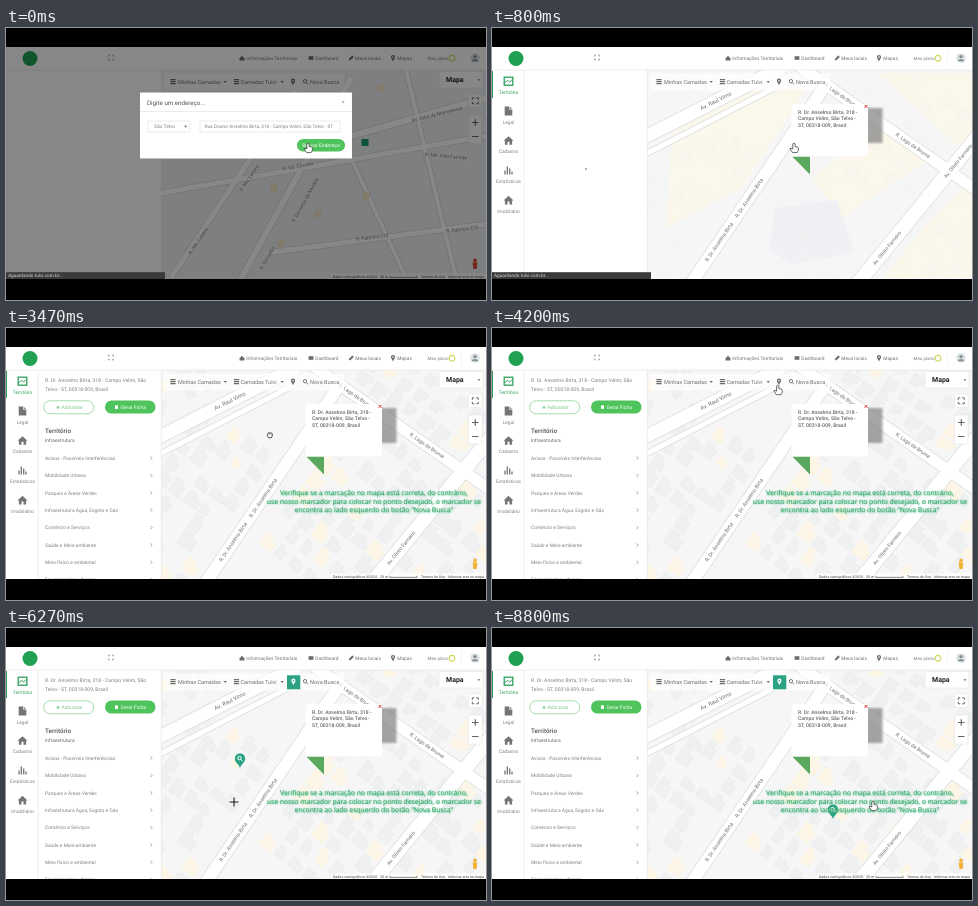
These frames come from a looping animation (480x272 px, 8870 ms). An HTML page:

```html
<!DOCTYPE html>
<html lang="pt-BR">
<head>
<meta charset="utf-8">
<title>Busca no mapa</title>
<style>
html, body { margin: 0; width: 100%; height: 100%; overflow: hidden; background: #000; }
svg { display: block; width: 100vw; height: 100vh; }
text { font-family: Roboto, Arial, sans-serif; text-rendering: geometricPrecision; }
.caption text { font-family: "Open Sans", "Noto Sans", sans-serif; text-shadow: .7px .9px 1.5px #4fc487, 0 0 2px #a5e2c0; }
</style>
</head>
<body>
<svg id="stage" viewBox="0 0 480 272"></svg>
<script>
const LOOP = 8870, GREEN = '#4fc45c', TEAL = '#2ba283', GREY = '#828282', INK = '#6c6c6c';
const CITY = 'São Telvo', STREET = 'R. Dr. Anselmo Birta', AVENUE = 'Av. Olinto Farneiro';

// Drawing helpers
const text = (x, y, s, size = 4.9, fill = GREY, more = '') =>
  `<text x="${x}" y="${y}" font-size="${size}" fill="${fill}" ${more}>${s}</text>`;
const mid = 'text-anchor="middle"', bold = 'font-weight="500"';
const rect = (x, y, w, h, fill, more = '') =>
  `<rect x="${x}" y="${y}" width="${w}" height="${h}" fill="${fill}" ${more}/>`;
const dot = (x, y, r, fill, more = '') => `<circle cx="${x}" cy="${y}" r="${r}" fill="${fill}" ${more}/>`;
const fillPath = (d, fill, more = '') => `<path d="${d}" fill="${fill}" ${more}/>`;
const line = (d, color, width = 1, more = '') =>
  `<path d="${d}" fill="none" stroke="${color}" stroke-width="${width}" ${more}/>`;
const group = (id, body, more = '') => `<g id="${id}" ${more}>${body}</g>`;
const at = (x, y, body, scale = 1) => `<g transform="translate(${x} ${y}) scale(${scale})">${body}</g>`;
const label = (x, y, angle, s, size = 5.2, fill = '#6b6e72') =>
  `<g transform="translate(${x} ${y}) rotate(${angle})">${text(0, 1.8, s, size, fill, mid + ' stroke="#fff" stroke-width=".9" paint-order="stroke"')}</g>`;
const roads = (list, edge, fill) =>
  list.map(([d, w]) => line(d, edge, w + 1.6)).join('') + list.map(([d, w]) => line(d, fill, w)).join('');

// Icons, centred on 0,0
const pin = (color, hole = '#fff') =>
  fillPath('M0 3.4C-.9 .9-2.1 .2-2.1-1.1a2.1 2.1 0 1 1 4.2 0C2.1 .2 .9 .9 0 3.4Z', color) + dot(0, -1.1, .8, hole);
const lens = (color, w = .9) => dot(-.5, -.5, 1.7, 'none', `stroke="${color}" stroke-width="${w}"`) + line('M.8 .8L2.6 2.6', color, w);
const layers = color => line('M-2.6-2h5.2M-2.6 0h5.2M-2.6 2h5.2', color, 1.2);
const house = fillPath('M-5 0L0-4.6 5 0H3.6V4H1V1H-1V4H-3.6V0Z', '#757575');
const corners = (r, color, w) =>
  line(`M${-r} -1V${-r}H-1M1 ${-r}H${r}V-1M${r} 1V${r}H1M-1 ${r}H${-r}V1`, color, w);

let seed = 11;
const random = () => (seed = seed * 16807 % 2147483647) / 2147483647;
function buildings(x, y, angle, cols, rows) {
  let out = '';
  for (let c = 0; c < cols; c++) for (let r = 0; r < rows; r++) {
    if (random() < .18) continue;
    const w = 9 + random() * 9, h = 9 + random() * 8, px = (c - cols / 2) * 19, py = (r - rows / 2) * 18;
    const cream = random() < .27;
    out += fillPath(`M${px} ${py}h${w}v${h * .6}h${-w * .3}v${h * .4}h${-w * .7}Z`,
      cream ? '#fdf6e6' : '#eff0f2', `stroke="${cream ? '#f8f0dd' : '#e6e7e9'}" stroke-width=".5"`);
  }
  return `<g transform="translate(${x} ${y}) rotate(${angle})">${out}</g>`;
}

function header() {
  const nav = [[236, 'Informações Territoriais'], [305, 'Dashboard'], [345, 'Meus locais'], [387, 'Mapas']];
  const icons = [fillPath('M-2.4 0L0-2.4 2.4 0V2.4H-2.4Z', INK), rect(-2.4, -2, 4.8, 3.6, INK),
    fillPath('M-2.4 1L1-2.4H2.4V-.6L-1 2.4Z', INK), pin(INK)];
  return rect(0, 18, 480, 24, '#fff') + line('M0 42H480', '#e6e6e6', .7) +
    dot(24, 30.5, 7.5, '#20a052') + at(105, 29.5, corners(2.4, GREY, .7)) +
    nav.map(([x, s], i) => at(x, 30.2, icons[i]) + text(x + 4.3, 32, s, 4.8, '#707070')).join('') +
    text(421.5, 32, 'Meu plano', 4.5) + dot(446, 30.2, 2.8, '#fff', 'stroke="#d2d763" stroke-width="1.1"') +
    line('M455.5 22V38', '#ececec', .6) +
    dot(469, 30, 4.8, '#dde3e5') + dot(469, 28.6, 1.7, '#838f93') + fillPath('M465.6 33.2a3.5 3 0 0 1 6.8 0Z', '#838f93');
}

function sidebar() {
  const names = ['Território', 'Legal', 'Cadastro', 'Estatísticas', 'Imobiliário'];
  const icons = [
    rect(-4.3, -4, 8.6, 8, 'none', 'stroke="#2fa05a" stroke-width="1.3"') + line('M-4 2L-1-1 1 1 4-2', '#2fa05a', 1),
    fillPath('M-3.8-4.5H1L3.8-1.7V4.5H-3.8Z', '#757575') + line('M1-4.5V-1.7H3.8', '#fff', .7),
    house, line('M-3.5 4V0M-1.2 4V-4M1.2 4V-2M3.5 4V1', '#757575', 1.3), house];
  return rect(0, 43, 1, 27, '#2fa05a') + names.map((s, i) =>
    at(16.5, 53.2 + 29.8 * i, icons[i]) + text(16.5, 66 + 29.7 * i, s, 4.8, i ? GREY : '#2fa05a', mid)).join('');
}

function panel() {
  const rows = ['Avisos - Possíveis Interferências', 'Mobilidade Urbana', 'Parques e Áreas Verdes',
    'Infraestrutura Água, Esgoto e Gás', 'Comércio e Serviços', 'Saúde e Meio-ambiente',
    'Meio físico e ambiental', 'Equipamentos urbanos'];
  return text(39, 54.3, `${STREET}, 318 - Campo Velim, São`, 5.1) + text(39, 62.6, 'Telvo - ST, 00318-009, Brasil', 5.1) +
    rect(37.7, 72.8, 50, 13, '#fff', `rx="6.5" stroke="#8bd594" stroke-width=".8"`) +
    dot(52, 79.4, 1.4, '#8bd594') + text(55.5, 81.1, 'Adicionar', 5, '#7cc488') +
    rect(99, 72.4, 50.5, 13.2, GREEN, 'rx="6.6"') + rect(109, 77.4, 3, 3.6, '#fff') + text(114.5, 81, 'Gerar Ficha', 5, '#fff') +
    text(39, 105, 'Território', 6.3, '#505050', bold) + text(39, 113.8, 'Infraestrutura', 4.9, '#666') +
    rows.map((s, i) => text(39, 132 + 17.35 * i, s) +
      line(`M144.6 ${128.6 + 17.35 * i}l1.5 1.6-1.5 1.6`, GREY, .7)).join('');
}

function map() {
  const streets = [['M150 128L290 56', 5], ['M150 110.5L292 38.5', 13], ['M300 33L490 166', 11],
    ['M196 260L337 52', 12], ['M362 260L490 103', 14]];
  const wash = fillPath('M180 95L260 55 315 60 250 160 175 200Z M385 45H480V130ZM390 95L440 130 350 190 320 150Z M440 190L480 150V250H390Z', '#fdf8ea') +
    fillPath('M282 180L345 172 362 225 300 236 278 222Z', '#eff0f5');
  const blocks = buildings(190, 170, -56, 9, 5) + buildings(355, 185, -53, 9, 7) +
    buildings(455, 215, -51, 6, 4) + buildings(400, 62, 35, 9, 3) + buildings(178, 62, -27, 4, 2);
  return rect(155, 42, 325, 209, '#f6f6f7') + group('wash', wash) + group('blocks', blocks) +
    roads(streets, '#dcdee1', '#fff') +
    label(224, 73, -27, 'Av. Raul Vimo', 5.6) + label(350, 68, 35, 'R. Lago de Brume') +
    label(421, 117.5, 35, 'R. Lago de Brume') + label(257, 170, -56, STREET) + label(227, 214, -56, STREET) +
    label(395, 220, -51, AVENUE);
}

const tools = () => rect(158, 45.5, 180, 17, '#fff', 'opacity=".72"') +
  at(167, 53.7, layers(INK)) + text(172, 55.8, 'Minhas Camadas', 5.5, '#707070') + fillPath('M217.5 53h3.4l-1.7 2Z', INK) +
  at(230.5, 53.7, layers(INK)) + text(234.5, 55.8, 'Camadas Tulvi', 5.5, '#707070') + fillPath('M274.5 53h3.4l-1.7 2Z', INK) +
  at(287, 53.8, pin(INK)) + at(299.5, 53.7, lens(INK)) + text(304, 55.8, 'Nova Busca', 5.5, '#707070');

const box = (x, y, w, h) => rect(x, y, w, h, '#fff', 'rx="1" stroke="#e4e4e4" stroke-width=".6"');
const pegman = color => at(469, 236, dot(0, -3.6, 1.8, color) + fillPath('M-2.4-1.6H2.4L1.6 5H-1.6Z', color));
const controls = () => box(433, 43.5, 44, 16.5) + text(440, 54.3, 'Mapa', 7, '#222', 'font-weight="700"') +
  fillPath('M471.5 51.2h2.8l-1.4 1.7Z', '#666') +
  box(462.5, 66, 13.5, 13.5) + at(469.3, 72.8, corners(3, '#666', 1)) +
  box(462.5, 87, 13.5, 29) + line('M466 94.5h6.6M469.3 91.2v6.6M466 108.5h6.6', '#666', 1.2) +
  pegman('#f2b032') +
  rect(325, 245.5, 155, 5.5, '#fff', 'opacity=".7"') + text(327, 249.6, 'Dados cartográficos ©2020', 3.6, '#444') +
  text(374, 249.6, '20 m', 3.6, '#444') + line('M384 247.8V249.4H411V247.8', '#555', .7) +
  text(415, 249.6, 'Termos de Uso', 3.6, '#444') + text(442, 249.6, 'Informar erro no mapa', 3.6, '#444');

const popup = () => rect(332, 80, 58.5, 35, '#777', 'opacity=".65" filter="url(#soft)"') +
  rect(299.5, 76, 76.5, 52.5, '#fff', 'rx="4"') + fillPath('M300.5 128.8H318V146.4Z', '#5aa75e') +
  line('M372.6 77l2.8 2.8M375.4 77l-2.8 2.8', '#d33', 1) +
  [`${STREET}, 318 -`, `Campo Velim, ${CITY} -`, 'ST, 00318-009, Brasil']
    .map((s, i) => text(306, 85.8 + 6.5 * i, s, 5.1, '#666', bold)).join('');

const status = () => rect(0, 244.2, 159, 6.8, '#3a3a3a') + text(2, 249.4, 'Aguardando tulvi.com.br...', 4.7, '#ddd');

function searchScreen() {
  const streets = [['M230 260L345 50', 6], ['M165 250L290 62', 5], ['M155 165L480 108', 5],
    ['M345 108L480 70', 6], ['M260 225L480 196', 5], ['M400 42L450 250', 4], ['M345 130L400 250', 4]];
  const patches = [[275, 215], [312, 186], [360, 168], [375, 60], [268, 160]];
  return rect(0, 42, 480, 209, '#fff') + rect(155, 42, 325, 209, '#eeeff0') + roads(streets, '#d3d5d8', '#fff') +
    patches.map(([x, y]) => dot(x, y, 4, '#f4dfb5', 'opacity=".7"')).join('') +
    label(431, 86, -14, 'Av. Dino de Marvolense', 5) + label(440, 128, 5, 'R. Me. Nilo Farrede', 5) +
    label(292, 138, -10, 'R. Sá. Corvino', 5) + label(243, 150, -56, 'R. Ma. Lunara', 5) + label(192, 213, -56, 'R. Ma. Lunara', 5) +
    label(299, 172, -61, 'R. Dorvaldo de Murães', 5) + label(261, 230, -61, 'R. Dorvaldo', 5) +
    label(366, 209, -7, 'R. Fabrício Cril', 5) + label(456, 201, -7, 'R. Fabrício Cril', 5) +
    rect(355.5, 111, 7, 7, '#18a06a') + header() + tools() + controls() + pegman('#d9483b') +
    rect(0, 18, 480, 233, '#000', 'opacity=".47"') + status() +
    rect(134, 64.5, 212, 66, '#fff', 'rx="1"') + text(141, 76.6, 'Digite um endereço...', 6.2, '#555') +
    text(335.5, 75.8, '×', 6, '#999') + line('M134 83.5H346', '#e6e6e6', .7) +
    rect(142, 93, 42, 11, '#fff', 'stroke="#ddd" stroke-width=".6"') + text(148, 100.3, CITY) + fillPath('M178 97.8h3l-1.5 1.9Z', INK) +
    rect(194, 93, 140, 11, '#fff', 'stroke="#ddd" stroke-width=".6"') +
    text(198.5, 100.3, `Rua Doutor Anselmo Birta, 318 - Campo Velim, ${CITY} - ST`, 4.75) +
    rect(291, 111, 48, 12.5, GREEN, 'rx="6.2"') + text(315, 119, 'Buscar Endereço', 5, '#fff', mid);
}

const caption = () => ['Verifique se a marcação no mapa está correta, do contrário,',
  'use nosso marcador para colocar no ponto desejado, o marcador se',
  'encontra ao lado esquerdo do botão "Nova Busca"']
  .map((s, i) => text(367.8, 166.8 + 8.7 * i, s, 6.75, '#38a069', mid)).join('');

const tip = () => fillPath('M285 63.5L287 61 289 63.5Z', '#383838') + rect(251.5, 63, 70.5, 17, '#383838', 'rx="1.5"') +
  text(286.8, 70, 'Clique aqui para consultar', 4.7, '#fff', mid) + text(286.8, 76.4, 'informações de uma localização', 4.7, '#fff', mid);

const hand = fillPath('M-1.2 .8Q0-.6 1.1 .8V3.6Q4.4 3.6 4.4 5V7.2L3.2 9.6H-1.4L-4 5.8Q-3.4 4.6-1.2 6Z', '#fff', 'stroke="#444" stroke-width=".8"');
const grab = at(0, 0, fillPath('M-2.6 3V1Q-1.7-.2-.9 .6 0-.4 .9 .6 1.8 0 2.6 1.4V4.2L1.6 6.2H-1.5L-3.4 3.6Z', '#fff', 'stroke="#333" stroke-width="1"') +
  line('M-.9 .8V2.4M.9 .8V2.4', '#333', .7), .85);
const cross = line('M-5 0H5M0-5V5', '#fff', 2.4) + line('M-4.5 0H4.5M0-4.5V4.5', '#111', 1.1);

stage.innerHTML = `<defs><filter id="soft"><feGaussianBlur stdDeviation="1.1"/></filter>
  <clipPath id="page"><path d="M0 19H480V251H0Z"/></clipPath></defs><g clip-path="url(#page)">` +
  group('main', rect(0, 18, 480, 233, '#fff') +
    group('tiles', map()) + group('early', label(466, 133, -51, AVENUE)) +
    group('bar', tools() + popup()) + group('extra', controls()) +
    rect(0, 42, 155, 209, '#fff') + line('M32.3 42V251M155.3 42V251', '#e8e8e8', .7) +
    group('side', sidebar()) + group('loader', dot(94, 141, 1, '#999')) + group('info', panel()) +
    group('waiting', status()) + header() +
    group('button', `<rect id="face" x="281" y="47.3" width="13.3" height="14"/>` + at(287.4, 53.8, pin('#fff', TEAL))) +
    group('hint', tip()) +
    group('marker', fillPath('M0 0C-1.4-4.6-5.2-5.4-5.2-9.6a5.2 5.2 0 1 1 10.4 0C5.2-5.4 1.4-4.6 0 0Z', TEAL) + at(0, -9.4, lens('#fff', 1))) +
    group('note', caption(), 'class="caption"')) +
  group('search', searchScreen()) +
  group('cursor', group('hand', hand) + group('grab', grab) + group('cross', cross)) + '</g>';

const el = id => document.getElementById(id);
const show = (id, opacity) => {
  el(id).style.display = opacity > 0 ? '' : 'none';
  el(id).style.opacity = Math.min(1, +opacity);
};
const move = (id, x, y) => el(id).setAttribute('transform', `translate(${x} ${y})`);

// time, x, y
const path = [[0, 302, 115], [2250, 302, 115], [2330, 264, 112], [3070, 264, 112], [3300, 264, 104.5], [3500, 264, 104.5],
  [3950, 281, 70], [4300, 287, 54], [5500, 287, 54], [5930, 234, 140], [6030, 234, 140], [6270, 228, 174],
  [6870, 258, 203], [7330, 295, 172], [7430, 295, 172], [7530, 305, 163], [7800, 322, 180], [8300, 341, 191],
  [8450, 341, 191], [8800, 381, 173], [LOOP, 381, 173]];
const drops = [[8400, 341, 191], [7400, 295, 172], [6000, 234, 140]];

function draw(t) {
  show('search', t < 70);
  show('main', t >= 70);
  show('side', t < 470 ? 0 : t < 530 ? .5 : 1);
  show('tiles', t < 670 ? 0 : Math.min(1, .4 + (t - 670) / 200));
  const detail = Math.min(1, Math.max(.15, (t - 800) / 500));
  show('blocks', detail);
  show('wash', 1 - detail);
  show('early', t >= 730 && t < 1200);
  show('bar', t >= 730);
  show('extra', t >= 1000);
  show('loader', t < 1070);
  show('info', t >= 1070);
  show('waiting', t < 1200);
  show('note', t >= 1270);
  show('button', t >= 4250);
  el('face').setAttribute('fill', t < 5500 ? '#4ca88e' : TEAL);
  show('hint', t >= 4400 && t < 5550);

  const drop = drops.find(d => t >= d[0]);
  show('marker', !!drop);
  if (drop) move('marker', drop[1], drop[2]);

  const i = path.findIndex(p => p[0] > t), [t0, x0, y0] = path[i - 1], [t1, x1, y1] = path[i];
  const u = (t - t0) / (t1 - t0), k = u * u * (3 - 2 * u);
  move('cursor', x0 + (x1 - x0) * k, y0 + (y1 - y0) * k);
  const crossing = t >= 5600 && t < 8600, grabbing = t >= 2270 && t < 4150;
  show('cross', crossing);
  show('grab', grabbing);
  show('hand', !crossing && !grabbing);
}

const start = performance.now();
function frame() {
  draw((performance.now() - start) % LOOP);
  requestAnimationFrame(frame);
}
frame();
</script>
</body>
</html>
```
